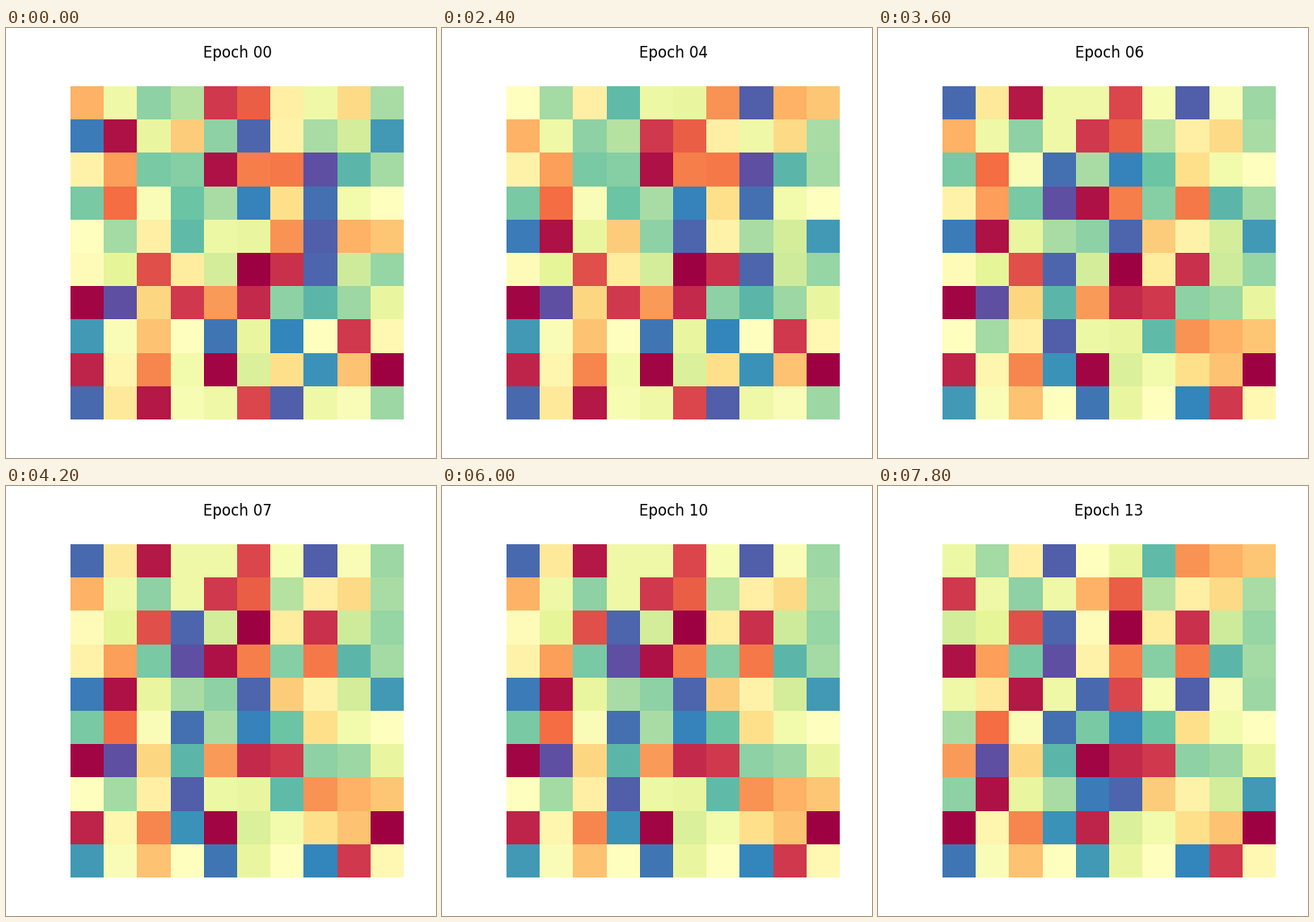
A matplotlib script for the animation above (8 s loop, 480 by 480 pixels).

```python
import matplotlib.pyplot as plt
import numpy as np
from matplotlib.animation import FuncAnimation

TICK_MS = 200
TICKS_PER_EPOCH = 3
N_TICKS = 40
ROWS, COLS = 0, 1

# The plotted data, in percent of the colormap range.
START = np.array([
    [31, 56, 74, 68, 9, 17, 45, 56, 39, 70],
    [92, 3, 58, 36, 74, 96, 46, 70, 63, 87],
    [46, 28, 77, 75, 3, 23, 22, 100, 82, 71],
    [77, 20, 52, 79, 70, 91, 40, 94, 55, 50],
    [50, 71, 45, 81, 57, 58, 26, 97, 31, 35],
    [49, 60, 14, 44, 63, 0, 8, 96, 64, 73],
    [1, 100, 38, 9, 27, 7, 74, 82, 72, 58],
    [87, 52, 34, 50, 93, 58, 90, 50, 9, 48],
    [6, 47, 24, 55, 1, 62, 40, 88, 34, 0],
    [95, 43, 4, 53, 56, 12, 97, 56, 52, 72],
]) / 100

# Each line in a cycle is replaced by the next one.
MOVES = {
    4: [(ROWS, (0, 4, 1))],
    5: [(ROWS, (0, 9, 7)), (ROWS, (2, 3)), (COLS, (3, 6))],
    6: [(COLS, (3, 7))],
    7: [(ROWS, (2, 5))],
    11: [(ROWS, (0, 7, 4))],
    13: [(COLS, (0, 4))],
}


def grid_at(epoch):
    order = np.tile(np.arange(10), (2, 1))
    for step in range(epoch + 1):
        for axis, cycle in MOVES.get(step, []):
            order[axis, cycle] = order[axis, np.roll(cycle, -1)]
    return START[np.ix_(*order)]


fig = plt.figure(figsize=(4.8, 4.8), dpi=100)
ax = fig.add_axes((0.15, 0.09, 0.775, 0.775))
# Hidden top tick labels still push the title upwards.
image = ax.matshow(START, cmap="Spectral", vmin=0, vmax=1)
ax.axis("off")
title = ax.set_title("Epoch 00")


def update(tick):
    epoch = tick // TICKS_PER_EPOCH
    image.set_data(grid_at(epoch))
    title.set_text(f"Epoch {epoch:02d}")
    return image, title


anim = FuncAnimation(fig, update, frames=N_TICKS, interval=TICK_MS,
                     repeat=True, repeat_delay=0, blit=False)
plt.show()
```
